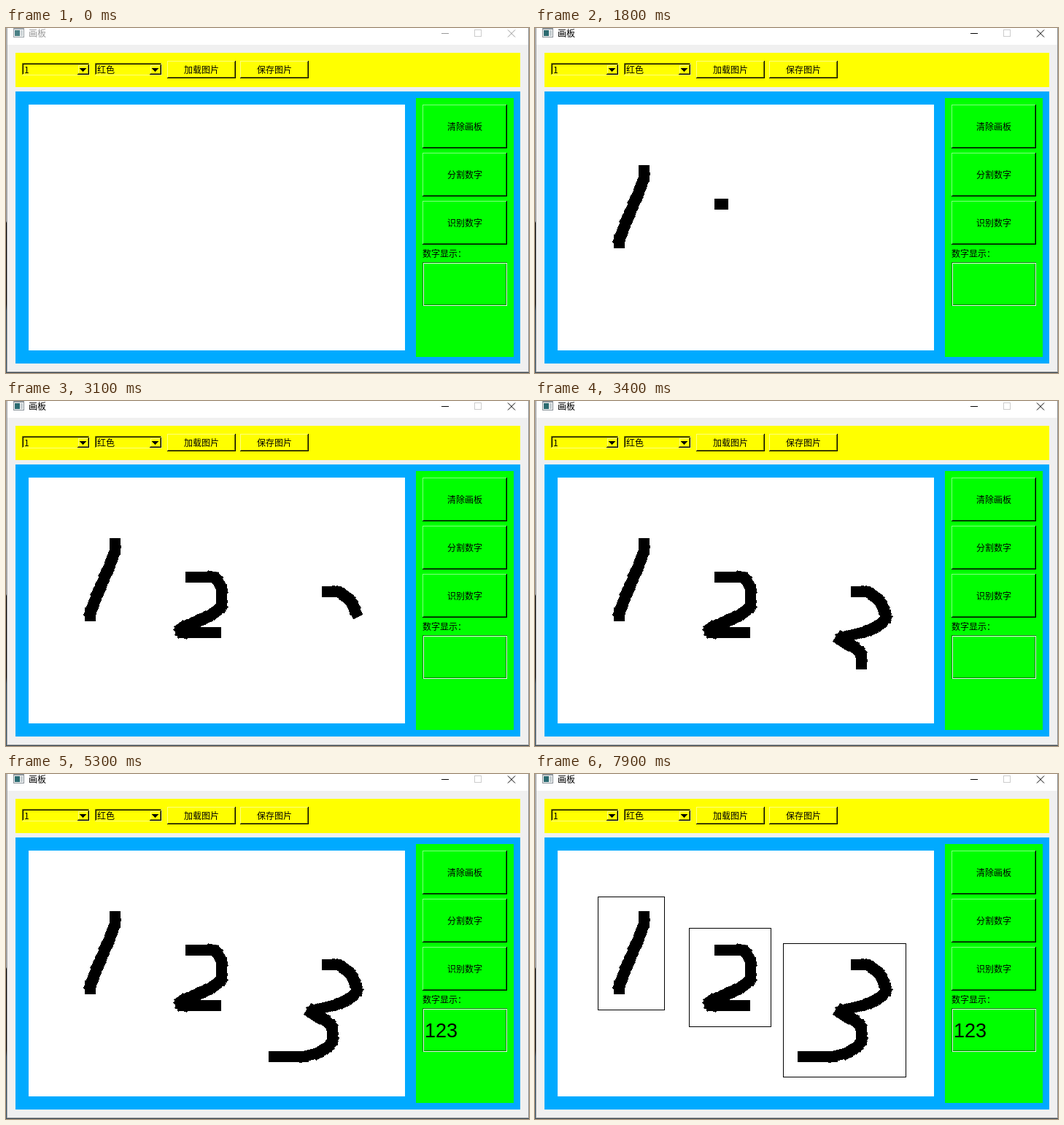
Write an HTML page that moves like this. It is 717 px wide and 473 px high and loops after 8000 ms.

```html
<!DOCTYPE html>
<html lang="zh-CN">
<head>
<meta charset="utf-8">
<title>画板</title>
<style>
  html, body { margin: 0; width: 717px; height: 473px; overflow: hidden; background: #f0f0f0; }
  svg { display: block; }
  text { font: 12px "Noto Sans CJK SC", "Noto Sans CJK", sans-serif; }
  .mid { text-anchor: middle; }
  #result { font: 27px "Liberation Sans", Arial, sans-serif; }
</style>
</head>
<body>
<svg id="stage" width="717" height="473" viewBox="0 0 717 473" shape-rendering="crispEdges">
  <defs>
    <linearGradient id="desk" x2="0" y2="1">
      <stop offset="0" stop-color="#b4b8bc"/>
      <stop offset=".56" stop-color="#9a9ea2"/>
      <stop offset=".565" stop-color="#000"/>
      <stop offset=".8" stop-color="#000"/>
      <stop offset=".82" stop-color="#1d3a52"/>
      <stop offset="1" stop-color="#3c5a70"/>
    </linearGradient>
  </defs>
  <rect width="717" height="473" fill="#f0f0f0"/>
  <rect width="717" height="23" fill="#fff"/>
  <rect width="2" height="473" fill="url(#desk)"/>
  <rect x="1" width="1" height="473" fill="#a8a8a8"/>
  <rect x="716" width="1" height="473" fill="#8c9094"/>
  <rect x="1" y="471" width="716" height="1" fill="#9a9a9a"/>
  <rect y="472" width="717" height="1" fill="#3c4a55"/>

  <g id="icon">
    <rect x="10" width="15" height="13" fill="#8a9298"/>
    <rect x="11" y="2" width="13" height="10" fill="#f4f6f6"/>
    <rect x="12" y="3" width="7" height="8" fill="#2b6a70"/>
    <rect x="20" y="3" width="3" height="8" fill="#c4ccd0"/>
  </g>
  <text id="title" x="31" y="12">画板</text>
  <g id="controls" fill="none">
    <path d="M597 7.5H607"/>
    <path d="M688 2.5L698 12.5M698 2.5L688 12.5" shape-rendering="auto"/>
  </g>
  <rect x="642.5" y="2.5" width="9" height="9" fill="none" stroke="#ccc"/>

  <rect x="13" y="34" width="692" height="47" fill="#ff0"/>
  <rect x="13" y="87" width="692" height="373" fill="#0af"/>
  <rect x="31" y="105" width="516" height="337" fill="#fff"/>
  <rect x="562" y="96" width="134" height="355" fill="#0f0"/>
  <g id="widgets"></g>
  <text x="571" y="314">数字显示：</text>
  <g fill="none">
    <path d="M571.5 381V321.5H687M573 379.5H685.5V323" stroke="#007f00"/>
    <rect x="572.5" y="322.5" width="114" height="58" stroke="#e4ffe4"/>
  </g>
  <text id="result" x="574" y="361">123</text>
  <g id="ink" fill="none" stroke="#000" stroke-width="15" stroke-linecap="square"></g>
  <g id="boxes" fill="none" stroke="#000">
    <rect x="86.5" y="168.5" width="91" height="155"/>
    <rect x="211.5" y="211.5" width="112" height="135"/>
    <rect x="340.5" y="232.5" width="168" height="183"/>
  </g>
</svg>
<script>
const LOOP = 8000, STEP = 100, PEN_STEP = 4;
const $ = id => document.getElementById(id);

function add(parent, tag, attrs, text = '') {
  const node = document.createElementNS('http://www.w3.org/2000/svg', tag);
  for (const key in attrs) node.setAttribute(key, attrs[key]);
  node.textContent = text;
  return parent.appendChild(node);
}

const yellow = { face: '#ff0', light: '#ffff7f', dark: '#7f7f00' };
const green = { face: '#0f0', light: '#7fff7f', dark: '#007f00' };

// Two nested one-pixel edges; colours run from outer to inner.
function bevel(parent, x, y, w, h, topLeft, bottomRight) {
  const group = add(parent, 'g', { fill: 'none' });
  for (let i = 0; i < 2; i++) {
    const l = x + i + .5, t = y + i + .5, r = x + w - i - .5, b = y + h - i - .5;
    add(group, 'path', { d: `M${l} ${b}V${t}H${r}`, stroke: topLeft[i] });
    add(group, 'path', { d: `M${l - .5} ${b}H${r}V${t - .5}`, stroke: bottomRight[i] });
  }
  return group;
}

function button(x, y, w, h, label, color) {
  const group = add($('widgets'), 'g', {});
  const { face, light, dark } = color;
  const raised = bevel(group, x, y, w, h, [light, face], ['#000', dark]);
  const sunken = bevel(group, x, y, w, h, ['#000', dark], [light, face]);
  add(group, 'text', { x: x + w / 2, y: y + h / 2 + 4.5, class: 'mid' }, label);
  return pressed => {
    show(raised, !pressed);
    show(sunken, pressed);
  };
}

function combo(x, w, label) {
  const group = add($('widgets'), 'g', {});
  const { face, light, dark } = yellow;
  bevel(group, x, 48, w, 17, [dark, '#000'], [light, face]);
  bevel(group, x + w - 17, 50, 16, 14, [face, light], ['#000', dark]);
  add(group, 'path', { d: `M${x + w - 14} 55h9l-4.5 5z` });
  add(group, 'text', { x: x + 3, y: 61.5 }, label);
}

function show(node, visible) {
  node.setAttribute('visibility', visible ? 'visible' : 'hidden');
}

combo(22, 93, '1');
combo(122, 92, '红色');
button(221, 45, 94, 24, '加载图片', yellow)(false);
button(321, 45, 94, 24, '保存图片', yellow)(false);
button(571, 105, 116, 60, '清除画板', green)(false);
const pressSplit = button(571, 171, 116, 60, '分割数字', green);
const pressRead = button(571, 237, 116, 60, '识别数字', green);

// Each stroke is a chain of short square-capped lines between whole pixels.
function stroke(start, stops, d) {
  const path = add($('ink'), 'path', { d });
  const length = path.getTotalLength();
  const count = Math.round(length / PEN_STEP);
  const points = Array.from({ length: count + 1 }, (_, i) => {
    const p = path.getPointAtLength(length * i / count);
    return `${Math.floor(p.x) + .5} ${Math.floor(p.y) + .5}`;
  });
  return time => {
    const step = Math.floor((time - start) / STEP);
    const done = step < 0 ? 0 : stops[Math.min(step, stops.length - 1)];
    const last = Math.round(done * count);
    let line = '';
    for (let i = 0; i < last; i++) line += `M${points[i]}L${points[i + 1]}`;
    path.setAttribute('d', line);
  };
}

const strokes = [
  stroke(1000, [.08, .6, 1],
    'M149.5 195.5V205C142 229 126 260 115.5 291V294.5'),
  stroke(1800, [.03, .2, .42, .64, .84, 1],
    'M253.5 241.5H281C291 243 295.5 254 295.5 264V280C289 293 264 301 248 308C238 312 237 316 242 317.5H287.5'),
  stroke(3000, [.05, .19, .35, .51, .66, .79, .91, 1],
    'M440.5 261.5H450C467 263 480 282 480.5 297C474 312 444 319 422 324C416 326 417 328 424 331C438 337 448 343 447.5 354V364C443 379 420 387 403 387.5H367.5')
];

function render(time) {
  const active = time >= 1000;
  $('title').setAttribute('fill', active ? '#000' : '#999');
  $('controls').setAttribute('stroke', active ? '#000' : '#999');
  $('icon').setAttribute('opacity', active ? 1 : .85);
  strokes.forEach(draw => draw(time));
  pressRead(time >= 5200 && time < 5300);
  pressSplit(time >= 7800 && time < 7900);
  show($('result'), time >= 5300);
  show($('boxes'), time >= 7900);
}

const begin = performance.now();
function tick() {
  render((performance.now() - begin) % LOOP);
  requestAnimationFrame(tick);
}
tick();
</script>
</body>
</html>
```
